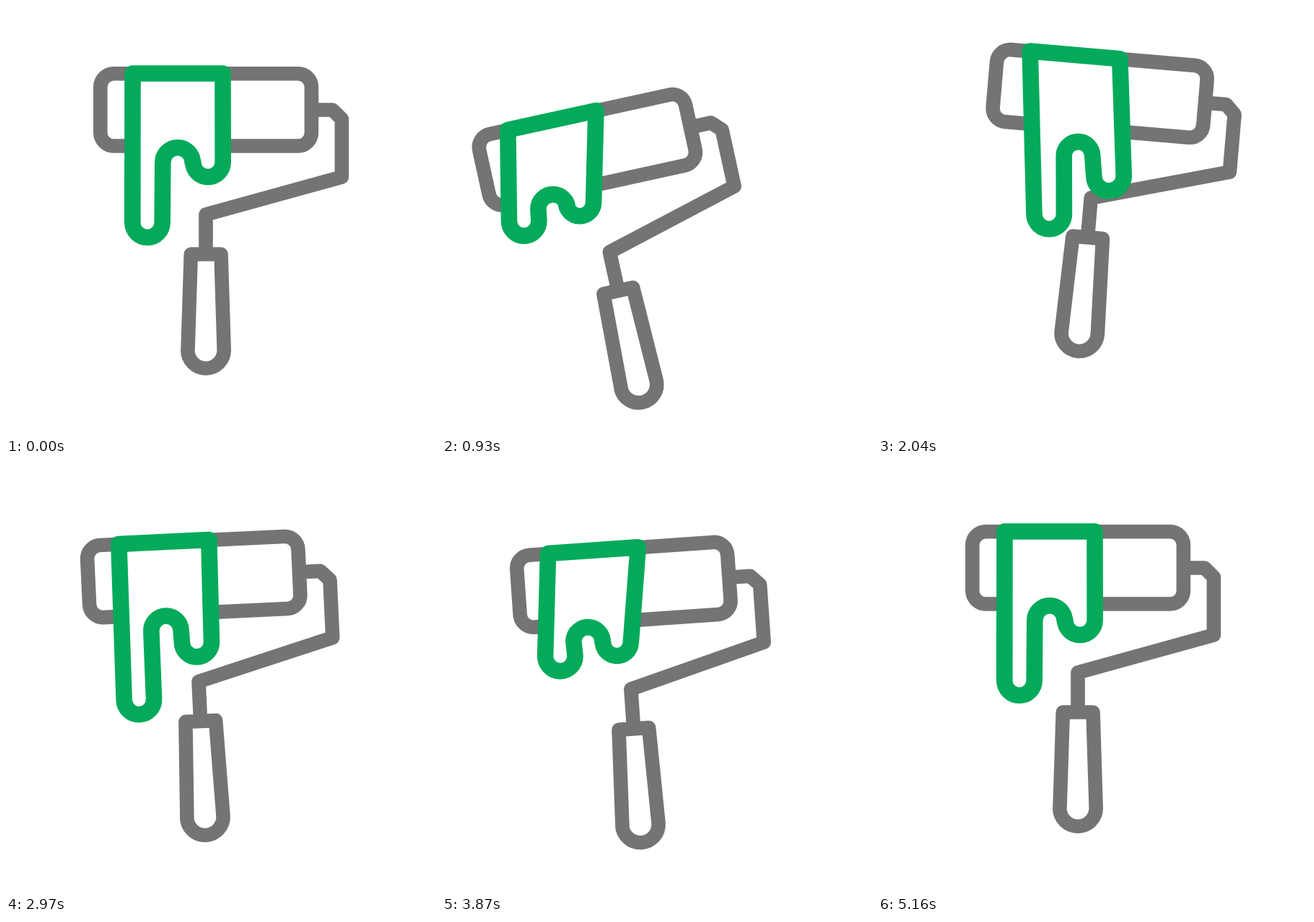
These frames come from a looping animation (596 by 596 pixels, 5.4 s). An HTML page with a canvas:

```html
<!DOCTYPE html>
<html>
<head>
<meta charset="utf-8">
<title>Paint roller</title>
<style>
html, body { margin: 0; width: 100%; height: 100%; overflow: hidden; background: #fff; }
canvas { display: block; }
</style>
</head>
<body>
<canvas id="stage" width="596" height="596"></canvas>
<script>
const ctx = document.getElementById('stage').getContext('2d');
const LOOP = 5400, SWING = 2700, STEP = 30;
const KEYS = [0, 900, 1560, 2460];
const LAG = 90;                       // the paint follows the roller
const GRAY = '#747474', GREEN = '#02aa5a';
const HANDLE = { x: 277, y: 477 };    // centre of the grip's round end

const clamp = v => Math.max(0, Math.min(1, v));
const smooth = u => u * u * (3 - 2 * u);

// Eased progress between the key poses: rest, left, right, rest
function progress(t) {
  const i = t < KEYS[1] ? 0 : t < KEYS[2] ? 1 : 2;
  return { i, s: smooth(clamp((t - KEYS[i]) / (KEYS[i + 1] - KEYS[i]))) };
}

function mix({ i, s }, left, right) {
  const v = [0, left, right, 0];
  return v[i] + (v[i + 1] - v[i]) * s;
}

function bump(t, from, to) {
  return Math.sin(Math.PI * clamp((t - from) / (to - from))) ** 2;
}

function stroke(color, width) {
  ctx.strokeStyle = color;
  ctx.lineWidth = width;
  ctx.stroke();
}

function drawRoller() {
  ctx.beginPath();
  ctx.roundRect(130.8, 93.8, 292.6, 100.2, 18.5);
  ctx.moveTo(424, 144);
  ctx.lineTo(452.5, 144);
  ctx.lineTo(465.4, 156.8);
  ctx.lineTo(465.4, 237);
  ctx.lineTo(277, 289);
  ctx.lineTo(277, 340);
  ctx.moveTo(298, 344);
  ctx.lineTo(256.3, 344);
  ctx.lineTo(252, 477);
  ctx.arc(277, 477, 25.2, Math.PI, 0, true);
  ctx.closePath();
  stroke(GRAY, 19.6);
}

function drawPaint(t) {
  const p = progress(Math.max(0, t - LAG));
  const top = 93.5, r = 20.7;
  const drip = 20 * bump(t, 0, 660) + 11 * bump(t, 1650, 2460);
  const a = { dx: mix(p, -26, 41.9), x: 196, y: 300 + mix(p, -79.5, 9) + drip, r };
  const b = { dx: mix(p, -25.3, 27.3), x: 238, y: 217 + mix(p, -3, 26), r: r + mix(p, -0.3, -1.6) };
  const c = { dx: mix(p, -29, 31.9), x: 280, y: 216.3 + mix(p, -3.5, 49) + drip, r: r + mix(p, -1.6, 0) };
  const tiltA = Math.atan(a.dx / (a.y - top));
  const tiltC = Math.atan(c.dx / (c.y - top));

  const bend = (o, tilt, under) =>
    ctx.arc(o.x + o.dx, o.y, o.r, Math.PI - tilt, (under ? 0 : 2 * Math.PI) - tilt, under);

  ctx.beginPath();
  ctx.moveTo(175.5, top);
  bend(a, tiltA, true);
  bend(b, (tiltA + tiltC) / 2, false);
  bend(c, tiltC, true);
  ctx.lineTo(300.5, top);
  ctx.closePath();
  ctx.fillStyle = '#fff';
  ctx.fill();
  stroke(GREEN, 22.6);
}

function draw(t) {
  const p = progress(t);
  const angle = mix(p, -12.5, 10.85) * Math.PI / 180;
  const sag = [3, 0, 10][p.i] * p.s * (1 - p.s);
  const dy = mix(p, 62.2, -42.3) - 600 * (1 - Math.cos(angle)) - sag;

  ctx.setTransform(1, 0, 0, 1, 0, 0);
  ctx.fillStyle = '#fff';
  ctx.fillRect(0, 0, 596, 596);
  ctx.translate(HANDLE.x - 0.093 * dy, HANDLE.y + dy);
  ctx.rotate(angle);
  ctx.translate(-HANDLE.x, -HANDLE.y);
  ctx.lineJoin = 'round';
  drawRoller();
  drawPaint(t);
}

const start = performance.now();
function tick() {
  const t = Math.floor(((performance.now() - start) % LOOP) / STEP) * STEP;
  // The second swing settles early and rests until the loop ends
  draw(t >= SWING + KEYS[3] ? 0 : t % SWING);
  requestAnimationFrame(tick);
}
tick();
</script>
</body>
</html>
```
